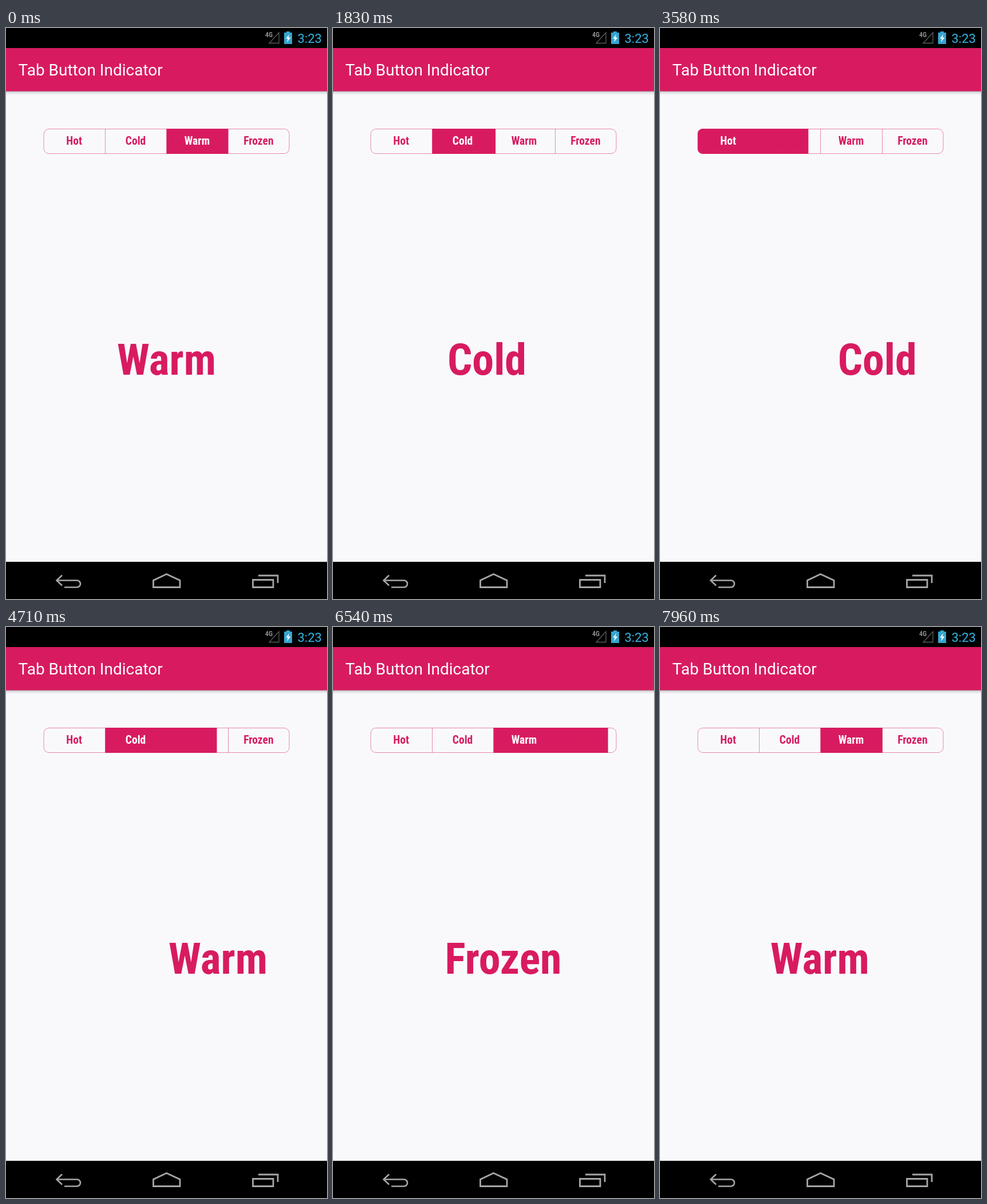
Recreate the animation shown at these times as an HTML page with a canvas. Size 561 by 998 pixels, loop 8 s.

```html
<!DOCTYPE html>
<html lang="en">
<head>
<meta charset="utf-8">
<title>Tab Button Indicator</title>
<style>
  html, body { margin: 0; width: 100%; height: 100%; overflow: hidden; background: #000; }
  canvas { display: block; }
</style>
</head>
<body>
<canvas id="stage" width="561" height="998"></canvas>
<script>
const ctx = document.getElementById('stage').getContext('2d');
const W = 561, H = 998, LOOP = 8000;
const PINK = '#d81b60', PAPER = '#f9f9fc', ICON = '#a6a6a4';
const LABELS = ['Hot', 'Cold', 'Warm', 'Frozen'];
const BAR = { x: 66, y: 176.5, w: 429.5, h: 43, r: 9 };
const CELL = BAR.w / LABELS.length;

// Page swipes; the indicator trails the page by lag.
const FIRST_PAGE = 2;
const SWIPES = [
  { at: 1195, dur: 700, to: 1, lag: 15 },
  { at: 2050, dur: 550, to: 0, lag: 15 },
  { at: 3002, dur: 800, to: 1, lag: 15 },
  { at: 4121, dur: 800, to: 2, lag: 15 },
  { at: 6230, dur: 350, to: 3, lag: 46 },
  { at: 7670, dur: 300, to: 2, lag: 5 }
];

const ease = s => (1 - Math.cos(Math.PI * Math.min(1, Math.max(0, s)))) / 2;

function pageAt(t, trailing) {
  let page = FIRST_PAGE;
  for (const s of SWIPES) {
    const start = s.at + (trailing ? s.lag : 0);
    if (t < start) break;
    page += (s.to - page) * ease((t - start) / s.dur);
  }
  return page;
}

function rect(x, y, w, h, color) {
  ctx.fillStyle = color;
  ctx.fillRect(x, y, w, h);
}

function path(points, close) {
  ctx.beginPath();
  points.forEach(([x, y], i) => i ? ctx.lineTo(x, y) : ctx.moveTo(x, y));
  if (close) ctx.closePath();
}

function line(points, color, width, close) {
  path(points, close);
  ctx.strokeStyle = color;
  ctx.lineWidth = width;
  ctx.stroke();
}

function text(str, x, y, size, color, align = 'left') {
  ctx.font = `${size}px Roboto, sans-serif`;
  ctx.fontStretch = 'normal';
  ctx.textAlign = align;
  ctx.fillStyle = color;
  ctx.fillText(str, x, y);
}

function boldText(str, x, y, size, color) {
  ctx.font = `bold condensed ${size}px "Roboto Condensed", Roboto, sans-serif`;
  ctx.fontStretch = 'condensed';
  ctx.textAlign = 'center';
  ctx.fillStyle = color;
  ctx.fillText(str, x, y);
}

function drawStatusBar() {
  rect(0, 0, W, 35, '#000');
  boldText('4G', 459.5, 16, 12, '#8a8a8a');
  line([[460, 26.5], [477, 26.5], [477, 8]], '#5c5c5c', 1.3, true);
  rect(490, 6, 6, 3, '#35a5cf');
  rect(486, 8, 14, 20, '#35a5cf');
  path([[495, 11], [489, 18.5], [492.5, 18.5], [491, 25], [497.5, 16.5], [493.5, 16.5]], true);
  ctx.fillStyle = '#f4fbff';
  ctx.fill();
  text('3:23', 509.5, 26, 22, '#33b5e5');
}

function drawAppBar() {
  const shade = ctx.createLinearGradient(0, 110, 0, 117);
  shade.addColorStop(0, 'rgba(0,0,0,.35)');
  shade.addColorStop(0.35, 'rgba(0,0,0,.12)');
  shade.addColorStop(1, 'rgba(0,0,0,0)');
  rect(0, 110, W, 7, shade);
  rect(0, 35, W, 75.5, PINK);
  text('Tab Button Indicator', 21.5, 83, 28, '#fff');
}

function drawNavBar() {
  rect(0, 933, W, H - 933, '#000');
  line([[98, 956.5], [88.5, 965.5], [98, 974.5]], ICON, 2.6);
  ctx.beginPath();
  ctx.moveTo(89, 965.5);
  ctx.lineTo(124, 965.5);
  ctx.arc(124, 971.5, 6, -Math.PI / 2, Math.PI / 2);
  ctx.lineTo(102, 977.5);
  ctx.stroke();
  line([[280.5, 954.5], [304, 965.5], [304, 977.5], [257.5, 977.5], [257.5, 965.5]], ICON, 2.8, true);
  line([[431.5, 964.5], [467, 964.5], [467, 977.5], [431.5, 977.5]], ICON, 2.8, true);
  line([[441, 957], [475, 957], [475, 970]], ICON, 2.8);
}

function drawTabs(page) {
  const selected = Math.floor(page + 1e-6);
  const cellX = i => BAR.x + i * CELL;

  ctx.strokeStyle = 'rgba(216,27,96,.5)';
  ctx.lineWidth = 1;
  ctx.beginPath();
  ctx.roundRect(BAR.x, BAR.y, BAR.w - 0.5, BAR.h, BAR.r);
  ctx.stroke();
  for (let i = 1; i < LABELS.length; i++) {
    const x = Math.floor(cellX(i)) + 0.5;
    line([[x, BAR.y], [x, BAR.y + BAR.h]], 'rgba(216,27,96,.5)', 1);
  }

  ctx.save();
  ctx.beginPath();
  ctx.roundRect(BAR.x - 0.5, BAR.y - 0.5, BAR.w + 0.5, BAR.h + 1, BAR.r);
  ctx.clip();
  // The selected cell stays filled while the indicator slides out of it.
  rect(cellX(selected), BAR.y - 0.5, CELL * (1 + page - selected), BAR.h + 1, PINK);
  ctx.restore();

  LABELS.forEach((label, i) =>
    boldText(label, cellX(i + 0.5) - 0.5, 203.5, 19.5, i === selected ? '#fff' : PINK));
}

function drawPages(page) {
  LABELS.forEach((label, i) => {
    const x = W / 2 + (i - page) * W;
    if (Math.abs(x - W / 2) < W) boldText(label, x, 606, 76, PINK);
  });
}

function draw(now) {
  const t = now % LOOP;
  rect(0, 0, W, H, PAPER);
  drawPages(pageAt(t, false));
  drawTabs(pageAt(t, true));
  drawAppBar();
  drawStatusBar();
  drawNavBar();
}

const begin = performance.now();
function tick() {
  draw(performance.now() - begin);
  requestAnimationFrame(tick);
}
tick();
</script>
</body>
</html>
```
